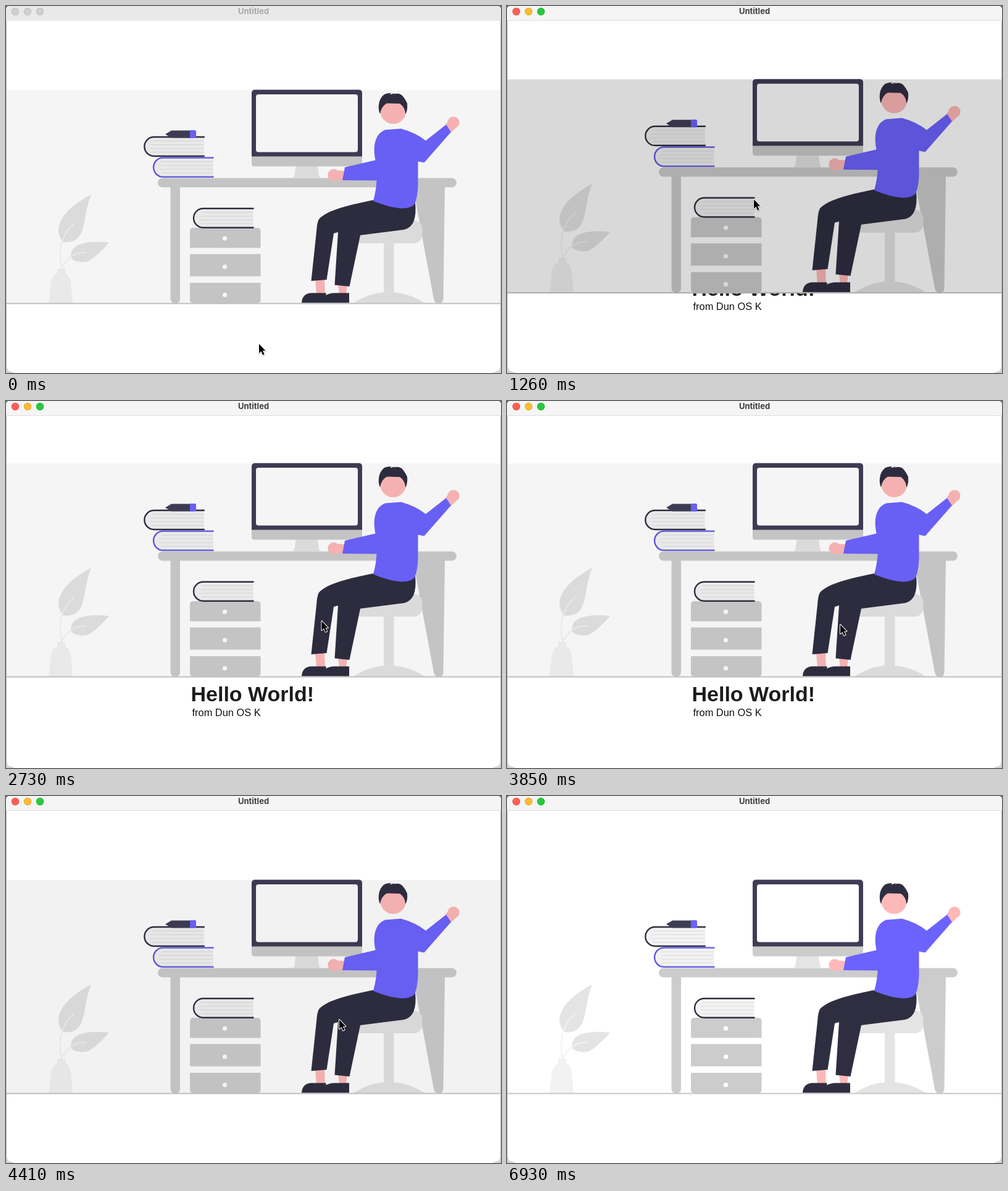
Write an HTML page with a canvas that moves like this. It is 802 px wide and 594 px high and loops after 7 s.

```html
<!DOCTYPE html>
<html lang="en">
<head>
<meta charset="utf-8">
<title>Untitled</title>
<style>
  html, body { margin: 0; width: 100%; height: 100%; overflow: hidden; background: #fff; }
  canvas { display: block; }
</style>
</head>
<body>
<canvas id="stage" width="802" height="594"></canvas>
<script>
const ctx = document.getElementById('stage').getContext('2d');
const W = 802, H = 594, LOOP = 7000, STEP = 70, LIFT = 35;
const DARK = '#2f2e41', SLATE = '#3f3d56', VIOLET = '#6c63ff', SKIN = '#ffb8b8';
const GREY = '#cccccc', LIGHT = '#e4e4e4', PALE = '#f2f2f2';

// Keyframes: [time, ...values]
const TINT = [[0, .04], [960, .04], [1100, .15], [1260, .15], [1600, .04],
  [3850, .04], [3990, .15], [4150, .15], [4480, .04], [5700, .04], [6020, 0]];
const POINTER = [[0, 410, 547], [560, 410, 547], [910, 400, 313], [2030, 400, 313],
  [2380, 438, 340], [2450, 438, 340], [2800, 520, 358], [3150, 520, 358],
  [3360, 536, 364], [3640, 536, 364], [3850, 540, 362], [4900, 540, 362],
  [5320, 648, 405], [5530, 648, 405], [5880, 716, 602]];

const smooth = u => { u = Math.max(0, Math.min(1, u)); return u * u * (3 - 2 * u); };

function sample(keys, t) {
  const next = keys.findIndex(k => k[0] > t);
  if (next < 0) return keys[keys.length - 1].slice(1);
  const a = keys[next - 1], b = keys[next];
  const u = smooth((t - a[0]) / (b[0] - a[0]));
  return a.slice(1).map((v, i) => v + (b[i + 1] - v) * u);
}

function rect(x, y, w, h, color, radius = 0) {
  ctx.fillStyle = color;
  ctx.beginPath();
  ctx.roundRect(x, y, w, h, radius);
  ctx.fill();
}

function disc(x, y, r, color) {
  ctx.fillStyle = color;
  ctx.beginPath();
  ctx.arc(x, y, r, 0, Math.PI * 2);
  ctx.fill();
}

function shape(d, color) {
  ctx.fillStyle = color;
  ctx.fill(new Path2D(d));
}

function line(d, color, width) {
  ctx.strokeStyle = color;
  ctx.lineWidth = width;
  ctx.stroke(new Path2D(d));
}

function label(text, x, y, font, color, align = 'left') {
  ctx.font = font;
  ctx.fillStyle = color;
  ctx.textAlign = align;
  ctx.fillText(text, x, y);
}

function drawBook(x, y, cover) {
  const outline = `M${x + 99} ${y}H${x + 17}a15.5 15.5 0 0 0 0 31H${x + 99}`;
  shape(`M${x + 98} ${y}H${x + 17}a15.5 15.5 0 0 0 0 31H${x + 98}Z`, PALE);
  for (let i = 0; i < 4; i++) {
    const inset = i % 3 ? 11 : 14;
    line(`M${x + inset} ${y + 6.5 + i * 6}H${x + 98}`, '#dcdcdc', 1);
  }
  line(outline, cover, 2.4);
}

function drawPlant() {
  shape('M83 425h13v7Q104 437 105 447L108 481H69L73 447Q74 437 83 432Z', PALE);
  shape('M138 305C110 320 85 340 85 364Q86 375 93 382Q115 385 123 365C130 345 127 335 138 305Z', LIGHT);
  shape('M167 383C140 380 115 382 107 396Q104 402 106 409Q115 416 130 414Q143 410 167 383Z', LIGHT);
  line('M90 425C85 398 88 370 111 352M91 423C100 406 114 398 130 399', PALE, 2);
}

function drawDesk() {
  shape('M662 292H711L708.5 474Q708 481.5 701 481.5Q694.5 481.5 693 474L664 318Z', GREY);
  rect(266.5, 288, 15.5, 193.5, GREY, 7.5);
  rect(246, 278.5, 484, 15, GREY, 7.5);
  rect(298, 359, 114.5, 32.5, GREY, [5, 5, 0, 0]);
  rect(298, 401.5, 114.5, 36, GREY);
  rect(298, 448, 114.5, 33, GREY, [0, 0, 5, 5]);
  for (const y of [376.2, 422.2, 467.6]) disc(354.5, y, 3.6, '#fff');
}

function drawMonitor() {
  shape('M469.5 259H505L507 274Q507.500 277 511 278.500H463Q467 277 467.500 274Z', LIGHT);
  rect(398, 243, 179, 16.5, GREY, [0, 0, 4, 4]);
  rect(398, 135.5, 179, 108, SLATE, [5, 5, 0, 0]);
  rect(405, 143, 165, 93.5, '#fff', 4);
}

function drawChair() {
  rect(560, 347, 114.5, 37, LIGHT, 14);
  rect(612, 383, 16.5, 84, LIGHT);
  shape('M563 481Q590 463 620 463Q651 463 679 481Z', LIGHT);
}

function drawPerson() {
  shape('M501 442H516L517 467H503ZM538 450H553L551 467H540Z', SKIN);
  shape('M479 480.500Q480 465 495 464.500H518.500V468Q525 464 534 464.500H556V480.500Z', DARK);
  shape('M596 314C560 321 520 330 507 345Q504 350 503 365L494.500 445L519.500 443L531 368L538 366' +
    'L532.500 451.500L556.500 454L574 371L645 362Q667 357 663 318Z', DARK);
  disc(531, 273.5, 9.7, SKIN);
  shape('M532 266L550 267V281L534 282Z', SKIN);
  disc(725, 188.5, 9.6, SKIN);
  shape('M712 192L718 184L730 196L721 205Z', SKIN);
  shape('M614 200.500L640 198.500Q664 205 680 218L713 192L721 204L677.500 253.500L667.500 251.500' +
    'L667.500 290Q667 309 662 321Q655 328 640 327.500Q620 326 595 315.500Q600 297 600.500 282.500' +
    'L545 282L549 261L598.500 249.500C596 236 596 226 599 217Q603 205 614 200.500Z', VIOLET);
  disc(627.3, 170, 20.8, SKIN);
  shape('M606 175Q603 168 604 160Q605 149 613 143Q619 140.500 624 141L622 143.500L630 141L628 143' +
    'Q635 140 641 144Q646 149 650 157.500Q651 168 647.500 175Q646 163 638 158L617 157.500Q608 162 606 175Z', DARK);
}

function drawScene(offset, tint) {
  ctx.save();
  ctx.translate(0, offset);
  rect(1, 136, 800, 346, '#fff');
  drawPlant();
  drawDesk();
  drawMonitor();
  drawBook(222.8, 212, DARK);
  drawBook(237.5, 245.6, '#5f56e4');
  drawBook(302.5, 327.7, DARK);
  shape('M258 207.500L268 201.500H298V213.500H268Z', SLATE);
  rect(298, 201, 10, 12.7, VIOLET, [0, 2, 2, 0]);
  drawChair();
  drawPerson();
  rect(1, 480.4, 800, 2, '#c8c8c8');
  rect(1, 136, 800, 346.4, `rgba(0,0,0,${tint})`);
  ctx.restore();
}

function drawTitleBar(active) {
  rect(0, 0, W, 24, active ? '#f5f5f5' : '#e9e9e9');
  if (active) rect(0, 23, W, 1, '#dedede');
  const lights = active ? ['#ff5f57', '#febc2e', '#28c840'] : Array(3).fill('#cfcfcf');
  const rims = active ? ['#e2463f', '#e0a028', '#1dad2b'] : Array(3).fill('#bababa');
  lights.forEach((color, i) => {
    disc(15 + i * 20, 9, 6.2, rims[i]);
    disc(15 + i * 20, 9, 5.5, color);
  });
  label('Untitled', 401, 13, 'bold 13px Inter, sans-serif', active ? '#3d3d3d' : '#a8a8a8', 'center');
}

function drawFrame() {
  shape('M0 582V594H12Q0 594 0 582ZM802 582V594H790Q802 594 802 582Z', '#d2d2d2');
  line('M.5 24V582Q.5 593.500 12 593.500M801.500 24V582Q801.500 593.500 790 593.500', '#b8b8b8', 1);
  shape('M0 0H3L0 3ZM802 0H799L802 3Z', '#666');
}

function drawPointer(x, y) {
  const arrow = 'M0 0V15L3.400 11.800L6 17.800L8.600 16.700L6 10.800H10.400Z';
  ctx.save();
  ctx.translate(x, y);
  ctx.lineJoin = 'round';
  ctx.shadowColor = 'rgba(0,0,0,.3)';
  ctx.shadowBlur = 2;
  ctx.shadowOffsetY = 1;
  line(arrow, '#fff', 2);
  ctx.shadowColor = 'transparent';
  shape(arrow, '#000');
  ctx.restore();
}

function render(now) {
  const t = Math.floor((now % LOOP) / STEP) * STEP;
  const open = smooth((t - 1087) / 350) - smooth((t - 3970) / 350);
  const slide = (open - 1) * LIFT;
  rect(0, 0, W, H, '#fff');
  if (open > 0) {
    label('Hello World!', 299.5, 486.3 + slide, 'bold 34px "Liberation Sans", Arial, sans-serif', '#1c1c1c');
    label('from Dun OS K', 301.5, 509.5 + slide, '16.4px "Liberation Sans", Arial, sans-serif', '#111');
  }
  drawScene(-open * LIFT, sample(TINT, t)[0]);
  drawTitleBar(t >= 560);
  drawFrame();
  if (t < 5880) drawPointer(...sample(POINTER, t));
}

const start = performance.now();
function tick() {
  render(performance.now() - start);
  requestAnimationFrame(tick);
}
tick();
</script>
</body>
</html>
```
